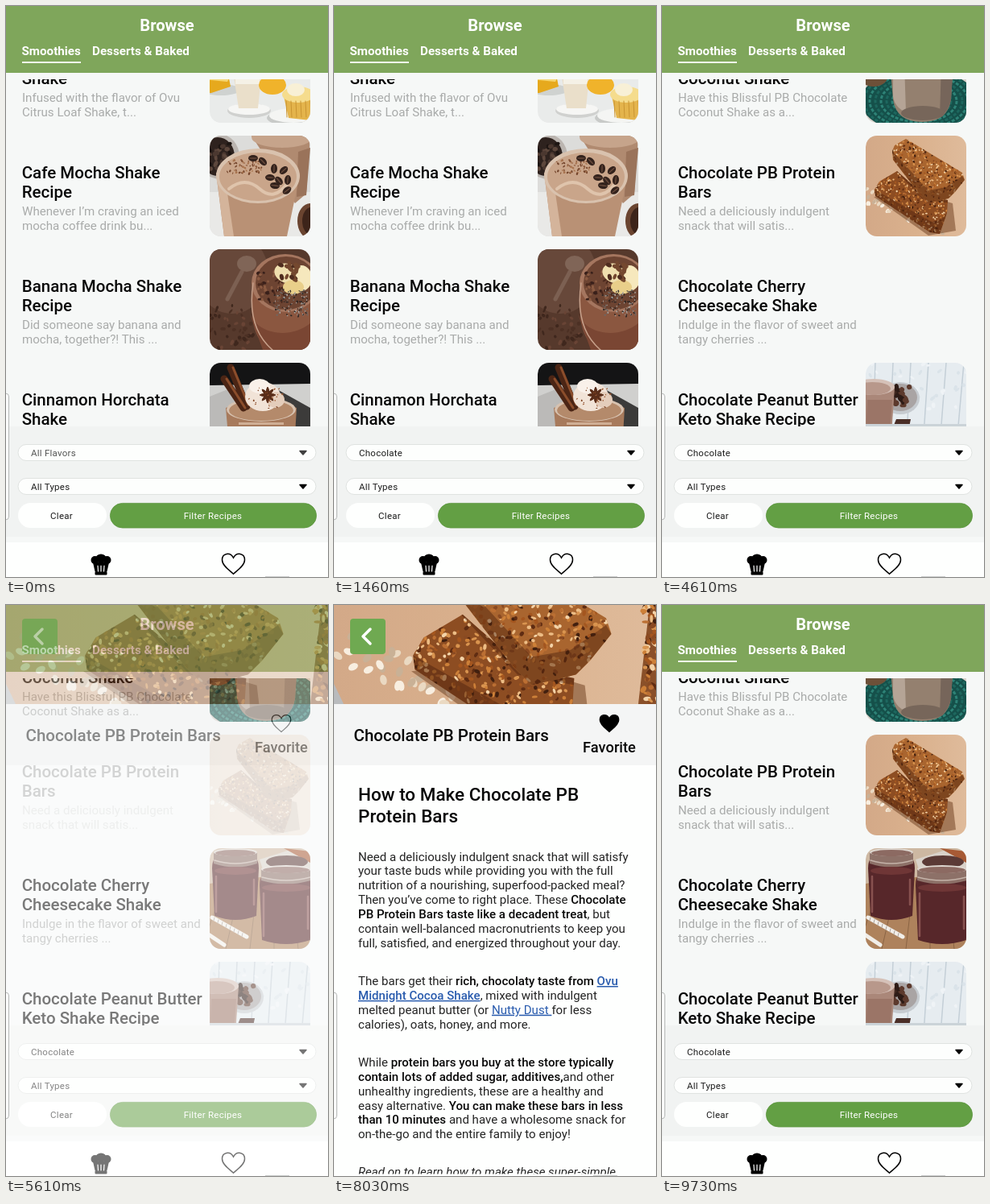
An HTML page that plays this animation: 400x709 px, repeating every 9940 ms.

```html
<!DOCTYPE html>
<html lang="en">
<head>
<meta charset="utf-8">
<title>Recipe browser</title>
<style>
html, body { margin: 0; width: 100%; height: 100%; overflow: hidden; background: #fefffe; }
svg { display: block; width: 100%; height: 100%; font-family: Roboto, Arial, sans-serif; }
.b { font-weight: 500; fill: #080808; }
.a { font-weight: 500; fill: #2a5cae; text-decoration: underline; }
.l { fill: #2a5cae; text-decoration: underline; }
.ui { font-size: 11.5px; letter-spacing: .25px; }
</style>
</head>
<body>
<svg id="stage" viewBox="0 0 400 709"></svg>
<script>
const LOOP = 9940;
let seed = 7;
const rnd = () => (seed = (seed * 16807) % 2147483647) / 2147483647;
const between = (a, b) => a + (b - a) * rnd();
const pick = list => list[Math.floor(rnd() * list.length)];
const times = (n, f) => Array.from({ length: n }, (_, i) => f(i)).join('');

// Drawing helpers
const rect = (x, y, w, h, fill, more = '') => `<rect x="${x}" y="${y}" width="${w}" height="${h}" fill="${fill}" ${more}/>`;
const oval = (x, y, rx, ry, fill, turn = 0) =>
  `<ellipse rx="${rx}" ry="${ry}" fill="${fill}" transform="translate(${x} ${y}) rotate(${turn})"/>`;
const path = (d, fill, more = '') => `<path d="${d}" fill="${fill}" ${more}/>`;
const line = (d, color, w) => path(d, 'none', `stroke="${color}" stroke-width="${w}" stroke-linecap="round" stroke-linejoin="round"`);
const text = (x, y, size, fill, s, more = '') => `<text x="${x}" y="${y}" font-size="${size}" fill="${fill}" ${more}>${s}</text>`;
const group = (id, s, more = '') => `<g id="${id}" ${more}>${s}</g>`;
const medium = 'font-weight="500"', bold = 'font-weight="700"', mid = ' text-anchor="middle"', ui = ' class="ui"';
const HEART = 'M0 12.5C-5 8-14 2-14-5C-14-13.5-4-15 0-7.5C4-15 14-13.5 14-5C14 2 5 8 0 12.5Z';

const specks = (n, x0, y0, x1, y1, r, colors) => times(n, () =>
  oval(between(x0, x1), between(y0, y1), r * between(.6, 1.2), r * between(.4, .8), pick(colors), between(0, 180)));

const GRAIN = ['#8a4a22', '#bb6f33', '#d9944f', '#5f2c12', '#edbd85', '#a4561f', '#cd8038', '#42200f', '#f3d3a8'];
const grainy = (id, d, base, box, shade) =>
  `<clipPath id="${id}"><path d="${d}"/></clipPath>` + path(d, base) +
  `<g clip-path="url(#${id})">${specks(680, ...box, 1.5, GRAIN)}${path(shade, '#4a200c', 'opacity=".45"')}</g>`;

// Photographs as flat shapes, each in a 125 px square
const bars = () =>
  times(62, () => {
    const u = rnd();
    return oval(-32 + u * 128, 60 + u * 56 + between(-9, 10), 2.9, 1.9, pick(['#f8eee0', '#ead9c2', '#c9b196']), between(0, 180));
  }) +
  path('M10 76L78 124L112 118L108 84L60 70Z', '#7d4f30', 'opacity=".6"') +
  grainy('low', 'M11 67L17 57L39 44L73 74L102 80L101 96L92 122L80 120L12 75Z', '#8d4d22', [10, 42, 105, 124],
    'M11 67L12 76L80 122L92 122L101 96L94 104L82 107ZM30 40L38 44L70 78L103 84V78L73 70L39 40Z') +
  grainy('up', 'M33 19L36 12L50 4L120 46L123 55L111 70L103 78L78 84L68 74L34 30Z', '#a9652f', [32, 3, 124, 85],
    'M33 19L34 30L68 74L78 84L103 78L111 70L123 55L120 50L100 64L78 68Z');

const lemon = () => rect(0, 0, 125, 125, '#e9ebea') +
  oval(14, 84, 24, 7, '#cfd2d0') + path('M0 66L24 70L26 80L2 88L0 88Z', '#e6a91d') + path('M0 66L24 70L22 74L0 72Z', '#f6d775') +
  oval(49, 110, 27, 9, '#d0d1cf') + oval(49, 108, 26, 7, '#f6f6f4') +
  path('M30 68H64L60 107H36Z', '#eadfca') + rect(32, 70, 30, 7, '#f5f1e6') +
  oval(78, 78, 17, 12, '#f0b32b') + oval(104, 119, 33, 10, '#c8cac8') + oval(104, 116, 30, 9, '#f4f5f3') +
  path('M92 92H126V122L98 119Z', '#e4b44c') + oval(110, 90, 20, 10, '#f5dc8d') + oval(107, 84, 11, 8, '#f8f0d6') +
  times(6, i => line(`M${95 + i * 6} 98l1 20`, '#c99432', 1));

const mocha = () => rect(0, 0, 125, 125, '#dcdcda') + rect(0, 70, 125, 55, '#e9e9e7') +
  oval(12, 26, 25, 28, '#bbb5b0') + oval(10, 26, 21, 24, '#2e221e') +
  specks(24, -2, 8, 27, 44, 4, ['#4b3830', '#1d1512', '#5d473c']) +
  path('M52 0H125L120 72L106 84Z', '#b08a70') + oval(90, 2, 38, 13, '#c6a48b') + path('M110 20L125 15L120 74L108 76Z', '#9a735a') +
  oval(125, 106, 16, 22, '#6a4430') + oval(126, 106, 11, 17, '#3d241a') +
  path('M8 46L18 125H96L112 48Z', '#b99175') + path('M8 46L18 125H30L20 58Z', '#d4b49b') +
  oval(60, 50, 52, 34, '#d9c2ae') + oval(60, 51, 48, 30, '#c9a58a') +
  specks(60, 22, 30, 66, 48, 1.5, ['#8d5a3c', '#a8744f', '#74452c']) +
  line('M24 66q20-16 38 0t34-6', '#dfc4ac', 4) +
  [54, 28, 66, 32, 80, 41, 92, 43, 75, 52, 86, 56, 97, 55, 96, 68, 81, 62].reduce((s, x, i, p) =>
    i % 2 ? s : s + oval(x, p[i + 1], 6, 4, '#33221c', i * 23) + oval(x, p[i + 1], 5, .7, '#6a4b3c', i * 23), '');

const banana = () => rect(0, 0, 125, 125, '#56392c') + oval(28, 30, 45, 50, '#67483a') +
  line('M22 62L40 28', '#7c6052', 5) + oval(46, 18, 12, 10, '#806557') +
  specks(50, 0, 70, 60, 125, 3, ['#3f271d', '#694435', '#4c3024']) +
  path('M55 40C48 80 54 112 74 125H125V22Z', '#8b5740') + path('M50 80C60 106 100 112 125 92V125H66Z', '#7a4633') +
  oval(94, 42, 42, 36, '#a5765f') + oval(95, 42, 38, 33, '#6d4432') +
  specks(60, 60, 28, 96, 66, 2.4, ['#4b291d', '#8a5a41', '#39201a']) +
  oval(96, 30, 16, 12, '#efdfae', 20) + oval(114, 36, 13, 16, '#f6e8bd') + oval(104, 47, 13, 9, '#e9cf8a') +
  specks(18, 88, 17, 110, 38, 4, ['#4f2d1f', '#74482f']) +
  specks(130, 80, 50, 122, 84, 1.2, ['#2c2624', '#a9a4a0', '#6d6763']) +
  line('M54 42C48 82 58 108 78 125', '#c7a18b', 1.5);

const horchata = () => rect(0, 0, 125, 125, '#141415') + path('M0 28L125 26V125H0Z', '#d0d0ce') +
  path('M0 42L30 30L60 125H0Z', '#bbbab8') + path('M82 32L125 56V125H96Z', '#3c3b3a') +
  path('M20 56Q60 38 108 56L104 125H26Z', '#a77a5c') + oval(64, 58, 43, 15, '#d7c2b0') + oval(64, 59, 40, 13, '#b48a6b') +
  line('M46 54L26 6M42 56L18 20', '#4b2515', 9) + line('M48 52L29 6M44 56L21 20', '#8b4d2b', 3) +
  oval(66, 42, 22, 18, '#f1e3d7') + oval(62, 29, 13, 9, '#f9f1ea') + oval(82, 46, 11, 10, '#e4cdbb') +
  times(8, i => oval(72, 40, 10, 2.2, '#5a2e1a', i * 45)) + specks(24, 48, 28, 92, 58, 1.2, ['#9d5b34', '#7b4122']) +
  rect(36, 74, 56, 3, '#cfae95');

const coconut = () => rect(0, 0, 125, 125, '#d9d2ca') + oval(66, 98, 72, 40, '#15504a') +
  times(7, i => `<ellipse cx="66" cy="98" rx="${68 - i * 7}" ry="${38 - i * 4}" fill="none" stroke="${i % 2 ? '#2d8276' : '#1d675e'}" stroke-width="3" stroke-dasharray="4 2"/>`) +
  oval(10, 66, 18, 14, '#6d5038') + path('M30 50H109L106 96Q102 124 70 124Q38 124 34 96Z', '#94806f') +
  path('M34 50H48L50 112Q36 106 34 92Z', '#b5a496') + path('M94 50H109L106 96Q103 112 92 118Z', '#76655a') + oval(71, 113, 27, 9, '#77665a');

const cherry = () => rect(0, 0, 125, 125, '#cdb8a2') + path('M0 44L125 28V125H0Z', '#ae825c') +
  times(5, i => line(`M${i * 30 - 10} 125L${i * 20 + 20} 38`, '#8a6444', 1)) +
  path('M62 14L100 2L125 12V34L70 38Z', '#d9d2ca') + path('M92 0L125 4V18Z', '#a75a35') + oval(96, 17, 26, 8, '#5b3a36') +
  [[32, 5, 29, 89], [95, 26, 33, 98]].map(([x, y, r, h]) =>
    path(`M${x - r} ${y + 20}Q${x - r} ${y + 12} ${x - r + 3} ${y + 8}H${x + r - 3}Q${x + r} ${y + 12} ${x + r} ${y + 20}L${x + r - 3} ${y + h - 10}Q${x} ${y + h} ${x - r + 3} ${y + h - 10}Z`, '#57272a') +
    line(`M${x - r + 5} ${y + 30}V${y + h - 15}M${x + r - 6} ${y + 34}V${y + h - 24}`, '#87514f', 2.5) +
    path(`M${x - r + 2} ${y}H${x + r - 2}V${y + 14}Q${x} ${y + 23} ${x - r + 2} ${y + 14}Z`, '#8d7168') +
    oval(x, y, r - 2, 5, '#ded7d0') + oval(x, y + 1, r - 4, 4, '#8c6a62') +
    line(`M${x - r + 3} ${y + 10}Q${x} ${y + 18} ${x + r - 3} ${y + 10}`, '#c4b2a8', 1.5) +
    oval(x, y + 23, r - 3, 5, '#6f3636')).join('') +
  line('M3 86L46 110M0 108L18 120', '#f1eee9', 5) + times(8, i => line(`M${6 + i * 5} ${86 + i * 2.8}l-1 4`, '#a99e96', 1));

const peanut = () => rect(0, 0, 125, 125, '#e6ecf0') +
  times(6, i => line(`M${i * 22 + 12} 0L${i * 21 + 9} 90`, '#c4cfd7', 1.5)) +
  specks(40, 0, 0, 125, 60, 3, ['#eff3f6', '#dae3e9']) +
  oval(43, 44, 24, 20, '#c6cbd0') + oval(43, 43, 21, 17, '#a9a4a4') +
  specks(26, 30, 30, 56, 54, 5, ['#402820', '#5c392c', '#2d1b16']) +
  path('M0 24Q34 22 36 30L32 90H0Z', '#aa8779') + path('M2 46H33L30 90H0Z', '#9b7567') + oval(10, 30, 26, 10, '#d5c1b8') + oval(8, 32, 23, 8, '#b8988b') +
  path('M38 70L56 70L54 80H34Z', '#4a2e27') + rect(0, 76, 125, 50, '#cbd3d8');

// Recipe list
const photo = (i, art, id) => group(id, `<g transform="translate(253 ${20 + 141 * i})"><g clip-path="url(#thumb)">${art}</g></g>`);
const row = (i, [head, tail, d1, d2, art, id]) => group('row' + id,
  [[head, 73], [tail, 97]].map(([s, y]) => text(19.7, y + 141 * i, 20.5, '#080808', s, medium)).join('') +
  [[d1, 119], [d2, 137]].map(([s, y]) => text(20, y + 141 * i, 15.1, '#a9abaa', s)).join('') +
  photo(i, art, 'pic' + id));
const list = (id, rows) => group(id, rows.map((r, i) => row(i, [...r, id + i])).join(''), 'clip-path="url(#listArea)"');

const first = list('A', [
  ['', 'Shake', 'Infused with the flavor of Ovu', 'Citrus Loaf Shake, t...', lemon()],
  ['Cafe Mocha Shake', 'Recipe', 'Whenever I’m craving an iced', 'mocha coffee drink bu...', mocha()],
  ['Banana Mocha Shake', 'Recipe', 'Did someone say banana and', 'mocha, together?! This ...', banana()],
  ['Cinnamon Horchata', 'Shake', '', '', horchata()]
]);
const second = list('B', [
  ['', 'Coconut Shake', 'Have this Blissful PB Chocolate', 'Coconut Shake as a...', coconut()],
  ['Chocolate PB Protein', 'Bars', 'Need a deliciously indulgent', 'snack that will satis...', rect(0, 0, 125, 125, 'url(#paper)') + '<use href="#bars"/>'],
  ['Chocolate Cherry', 'Cheesecake Shake', 'Indulge in the flavor of sweet and', 'tangy cherries ...', cherry()],
  ['Chocolate Peanut Butter', 'Keto Shake Recipe', '', '', peanut()]
]);

const select = (y, id, label) => rect(15, y + .5, 370, 20, '#fdfefd', 'rx="10" stroke="#e0e3e1"') +
  group(id, text(31, y + 15, 12, '#1c1c1c', label, `id="${id}Label"` + ui) +
    path(`M365 ${y + 8.5}h8l-4 4.5z`, '#000', 'stroke="#000" stroke-width="1.5" stroke-linejoin="round"'));

const hat = oval(110.5, 688, 5, 5, '#000') + oval(118, 686, 6.5, 5.5, '#000') + oval(125.5, 688, 5, 5, '#000') +
  path('M108 691H128L125.5 702H110.5Z', '#000') + rect(110.5, 702, 15, 4.5, '#000', 'rx="1"') +
  line('M114 695l.5 7M118 695v7M122 695l-.5 7', '#fff', 1.2);

const browse = rect(0, 0, 400, 709, '#f6f8f7') + first + second +
  group('bar', rect(377, 274, 4, 156, '#babdbb')) +
  rect(0, 0, 400, 83, '#7fa65b') +
  text(200, 31, 20.2, '#fff', 'Browse', bold + mid) +
  text(19.5, 61, 15.2, '#fff', 'Smoothies', bold) + text(107, 61, 15.2, '#fff', 'Desserts &amp; Baked', bold) +
  rect(20, 69, 73, 2, '#f4f8f0') +
  rect(0, 522, 400, 137, '#f1f3f2') + select(544, 'flavor', 'All Flavors') + select(586, 'type', 'All Types') +
  rect(15, 617, 110, 31, '#fefffe', 'rx="15.5"') + text(69, 637, 12, '#1c1c1c', 'Clear', ui + mid) +
  group('filter', rect(129.4, 617.4, 256.2, 30.6, '#639f44', 'rx="15.3" stroke="#5b953d" stroke-width=".8"') +
    text(257, 637, 12, '#fff', '', 'id="filterLabel"' + ui + mid)) +
  rect(0, 666, 400, 43, '#fefffe') + hat +
  path(HEART, 'none', 'stroke="#000" stroke-width="1.5" transform="translate(282.5 692.7)"');

const picker = group('picker', rect(0, 0, 400, 709, '#000', 'opacity=".45"') + rect(30, 306, 340, 96, '#fefffe', 'rx="4"') +
  text(50, 338, 15.1, '#151515', 'All Flavors') + text(50, 381, 15.1, '#151515', 'Chocolate'));

// Recipe page
const b = s => `<tspan class="b">${s}</tspan>`;
const copy = (y, lines) => lines.map((s, i) => text(30, y + 17.85 * i, 15.07, '#242424', s)).join('');
const article = group('article',
  text(30, 243, 22.5, '#080808', 'How to Make Chocolate PB', medium) + text(30, 270, 22.5, '#080808', 'Protein Bars', medium) +
  copy(317.5, [
    'Need a deliciously indulgent snack that will satisfy',
    'your taste buds while providing you with the full',
    'nutrition of a nourishing, superfood-packed meal?',
    'Then you’ve come to right place. These ' + b('Chocolate'),
    b('PB Protein Bars taste like a decadent treat') + ', but',
    'contain well-balanced macronutrients to keep you',
    'full, satisfied, and energized throughout your day.'
  ]) +
  copy(472, [
    'The bars get their ' + b('rich, chocolaty taste from ') + '<tspan class="a">Ovu</tspan>',
    '<tspan class="a">Midnight Cocoa Shake</tspan>, mixed with indulgent',
    'melted peanut butter (or <tspan class="l">Nutty Dust&#160;</tspan>for less',
    'calories), oats, honey, and more.'
  ]) +
  copy(573, [
    'While ' + b('protein bars you buy at the store typically'),
    b('contain lots of added sugar, additives,') + 'and other',
    'unhealthy ingredients, these are a healthy and',
    'easy alternative. ' + b('You can make these bars in less'),
    b('than 10 minutes') + ' and have a wholesome snack for',
    'on-the-go and the entire family to enjoy!'
  ]) +
  text(30, 709, 15.07, '#242424', 'Read on to learn how to make these super-simple', 'font-style="italic"'),
  'clip-path="url(#page)"');

const detail = group('detail', rect(0, 0, 400, 709, '#fefffe') +
  `<g clip-path="url(#hero)">${rect(0, 0, 400, 123, 'url(#paper)')}${path('M0 98L12 123H0Z', '#b9bbbd')}` +
  '<use href="#bars" transform="translate(74 -85) scale(2.2)"/>' +
  path('M392 0H400V123H378Z', '#8a5029') + specks(60, 384, 0, 402, 123, 4, GRAIN) + '</g>' +
  rect(20, 17, 44, 44, '#6fa951', 'rx="4"') + line('M45 30L36 39L45 48', '#fff', 3.5) +
  rect(0, 123, 400, 76, '#f4f5f5') + text(24.5, 169, 20.5, '#080808', 'Chocolate PB Protein Bars', medium) +
  path(HEART, 'none', 'id="heart" stroke="#000" stroke-width="1.5" transform="translate(342 147) scale(.84)"') +
  text(342, 183, 18.3, '#080808', 'Favorite', medium + mid) + article);

const clip = (id, s) => `<clipPath id="${id}">${s}</clipPath>`;
const stage = document.getElementById('stage');
stage.innerHTML = '<defs>' +
  clip('thumb', rect(0, 0, 125, 125, '#000', 'rx="14"')) + clip('listArea', rect(0, 91, 400, 431, '#000')) +
  clip('page', rect(0, 199, 400, 507.5, '#000')) + clip('hero', rect(0, 0, 400, 123, '#000')) +
  '<linearGradient id="paper"><stop stop-color="#d3a988"/><stop offset=".5" stop-color="#dab18d"/><stop offset="1" stop-color="#dfbb9b"/></linearGradient>' +
  group('bars', bars()) + '</defs>' +
  browse + picker + detail +
  rect(-10, 481, 13.5, 157, '#fefffe', 'rx="4" stroke="#b4b6b5"') + rect(322, 708, 30, 1, '#c9cbca');

const el = id => document.getElementById(id);
const ramp = (t, a, z) => Math.min(1, Math.max(0, (t - a) / (z - a)));
const dip = (t, a, z) => 1 - .6 * Math.sin(Math.PI * ramp(t, a, z));
const fade = (id, v) => {
  el(id).style.opacity = v;
  el(id).style.display = v > 0 ? '' : 'none';
};
const label = (id, s) => { if (el(id).textContent !== s) el(id).textContent = s; };

function draw(t) {
  fade('picker', ramp(t, 30, 230) * (1 - ramp(t, 1150, 1400)));
  el('flavor').style.opacity = t < 230 ? .75 : 1;
  label('flavorLabel', t < 1000 ? 'All Flavors' : 'Chocolate');

  el('filter').style.opacity = dip(t, 2030, 2500);
  label('filterLabel', t >= 2300 && t < 3300 ? 'Filtering Recipes...' : 'Filter Recipes');
  fade('A', t < 2910 ? 1 : .75 * (1 - ramp(t, 3000, 3240)));
  fade('B', ramp(t, 3300, 3640));
  fade('bar', t >= 2910 ? 1 - ramp(t, 3850, 3910) : 0);
  fade('picB1', ramp(t, 3820, 3880));
  fade('picB2', ramp(t, 4640, 4940));

  el('rowB1').style.opacity = t < 5800 ? 1 - .7 * ramp(t, 5150, 5300) : 1;
  fade('detail', t < 8670 ? ramp(t, 5450, 5800) : t < 8730 ? .5 : 0);
  fade('article', t < 6580 ? 0 : 1);
  el('heart').style.opacity = dip(t, 7390, 7800);
  el('heart').style.fill = t < 7600 ? 'none' : '#000';
}

function tick() {
  draw(performance.now() % LOOP);
  requestAnimationFrame(tick);
}
tick();
</script>
</body>
</html>
```
